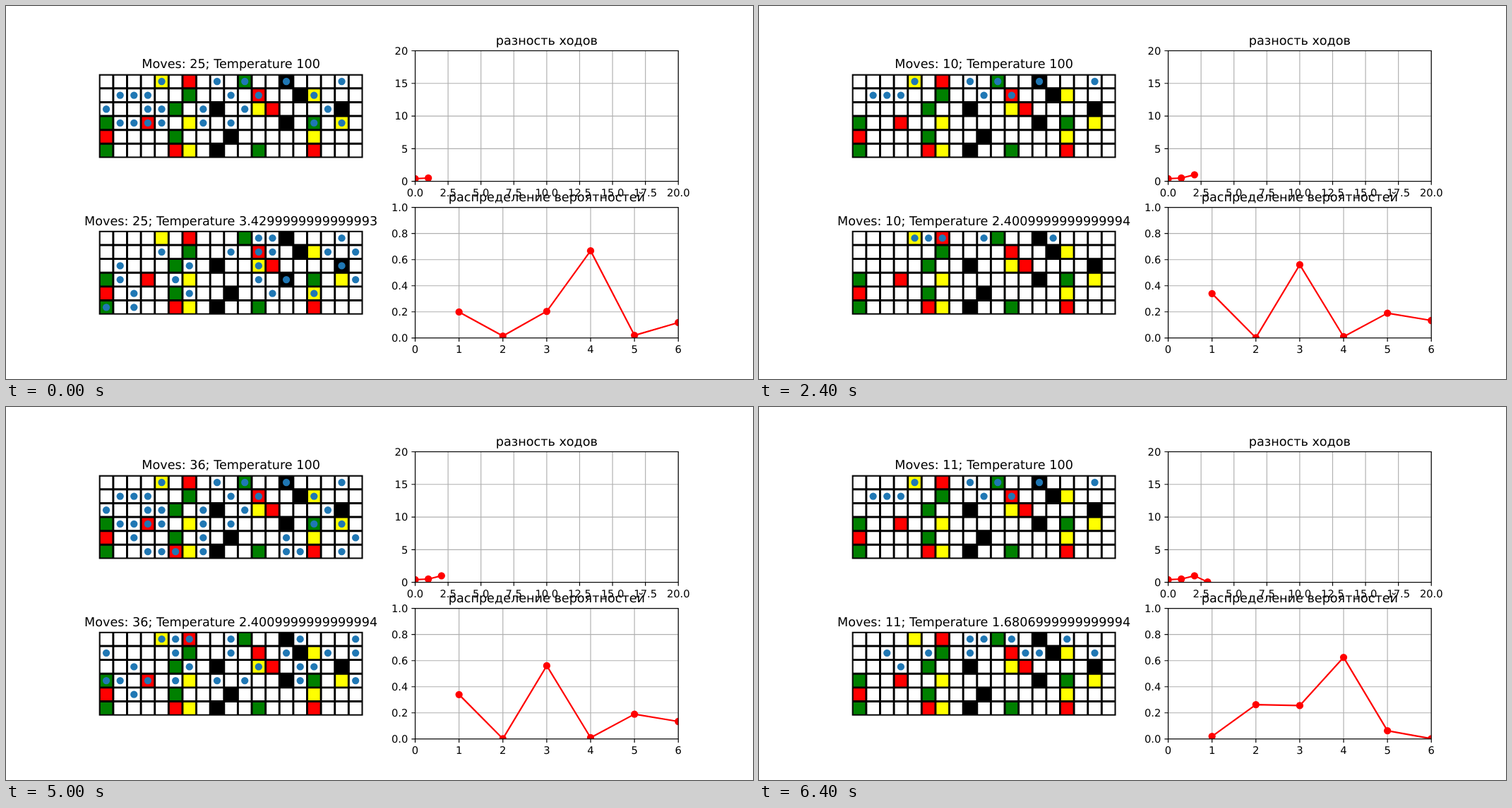
Write an HTML page that moves like this. It is 1058 px wide and 529 px high and loops after 6500 ms.

```html
<!DOCTYPE html>
<html lang="ru">
<head>
<meta charset="utf-8">
<style>
  html, body { margin: 0; width: 100%; height: 100%; overflow: hidden; background: #fff; }
  svg { display: block; width: 100%; height: 100%; }
  text { font-family: "DejaVu Sans", sans-serif; font-size: 14.69px; text-rendering: geometricPrecision; }
  .title { font-size: 17.63px; text-anchor: middle; }
  .mid { text-anchor: middle; }
  .end { text-anchor: end; }
</style>
</head>
<body>
<svg id="stage" viewBox="0 0 1058 529"></svg>
<script>
const NS = 'http://www.w3.org/2000/svg';
const stage = document.getElementById('stage');
const PT = 1058 / 720;
const LEFT = 132.25, RIGHT = 579.53, W = 372.7, H = 185.15;
const COLS = 19, CELL = W / COLS;

function add(parent, tag, attrs, text) {
  const el = document.createElementNS(NS, tag);
  for (const k in attrs) el.setAttribute(k, attrs[k]);
  if (text !== undefined) el.textContent = text;
  parent.appendChild(el);
  return el;
}

function clip(id, x, y, w, h) {
  add(add(stage, 'clipPath', { id }), 'rect', { x, y, width: w, height: h });
  return add(stage, 'g', { 'clip-path': `url(#${id})` });
}

function frame(x, y, w, h) {
  add(stage, 'rect', { x, y, width: w, height: h, fill: 'none', stroke: '#000', 'stroke-width': 0.8 * PT });
}

const MAP = [
  '....Y.R...G..K.....',
  '......G....R..KY...',
  '.....G..K..YR....K.',
  'G..R..Y......K.G.Y.',
  'R....G...K.....Y...',
  'G....RY.K..G...R...'
];
const PAINT = { Y: '#ff0', R: '#f00', G: '#008000', K: '#000' };

function makeBoard(id, top) {
  const h = MAP.length * CELL;
  const g = clip(id, LEFT, top, W, h);
  MAP.forEach((row, r) => [...row].forEach((c, i) => {
    if (PAINT[c]) add(g, 'rect', { x: LEFT + i * CELL, y: top + r * CELL, width: CELL, height: CELL, fill: PAINT[c] });
  }));
  let d = '';
  for (let i = 0; i <= COLS; i++) d += `M${LEFT + i * CELL} ${top}v${h}`;
  for (let i = 0; i <= MAP.length; i++) d += `M${LEFT} ${top + i * CELL}h${W}`;
  add(g, 'path', { d, stroke: '#000', 'stroke-width': 2 * PT });
  const dots = MAP.flatMap((row, r) => [...row].map((_, i) =>
    add(g, 'circle', { cx: LEFT + (i + 0.5) * CELL, cy: top + (r + 0.5) * CELL, r: 3.5 * PT, fill: '#1f77b4' })));
  frame(LEFT, top, W, h);
  const title = add(stage, 'text', { class: 'title', x: LEFT + W / 2, y: top - 6 * PT });

  return (path, move, temp) => {
    const seen = new Set(path.slice(0, move).flat());
    dots.forEach((dot, i) => dot.setAttribute('visibility', seen.has(i) ? 'visible' : 'hidden'));
    title.textContent = `Moves: ${Math.min(move, path.length)}; Temperature ${temp}`;
  };
}

function makePlot(id, top, name, xMax, xStep, yMax, yStep, xDigits, yDigits) {
  const px = x => RIGHT + x / xMax * W;
  const py = y => top + H - y / yMax * H;
  let grid = '', ticks = '';
  for (let i = 0; i <= Math.round(xMax / xStep); i++) {
    const x = px(i * xStep);
    grid += `M${x} ${top}v${H}`;
    ticks += `M${x} ${top + H}v${3.5 * PT}`;
    add(stage, 'text', { class: 'mid', x, y: top + H + 21.4 }, (i * xStep).toFixed(xDigits));
  }
  for (let i = 0; i <= Math.round(yMax / yStep); i++) {
    const y = py(i * yStep);
    grid += `M${RIGHT} ${y}h${W}`;
    ticks += `M${RIGHT} ${y}h${-3.5 * PT}`;
    add(stage, 'text', { class: 'end', x: RIGHT - 7 * PT, y: y + 5.4 }, (i * yStep).toFixed(yDigits));
  }
  const g = clip(id, RIGHT, top, W, H);
  add(g, 'path', { d: grid, stroke: '#b0b0b0', 'stroke-width': 0.8 * PT });
  add(stage, 'path', { d: ticks, stroke: '#000', 'stroke-width': 0.8 * PT });
  const series = add(g, 'g', {});
  frame(RIGHT, top, W, H);
  add(stage, 'text', { class: 'title', x: RIGHT + W / 2, y: top - 6 * PT }, name);

  return (values, first) => {
    series.textContent = '';
    const pts = values.map((v, i) => [px(i + first), py(v)]);
    add(series, 'polyline', { points: pts.join(' '), fill: 'none', stroke: '#f00', 'stroke-width': 1.5 * PT, 'stroke-linejoin': 'round' });
    for (const [cx, cy] of pts) add(series, 'circle', { cx, cy, r: 3.5 * PT, fill: '#f00' });
  };
}

const hold = (cell, n) => Array(n).fill(cell);
const long = (head, last) => head.padEnd(17, '9') + last;

// Cell reached on each move; a repeat is a lost turn, a pair is a double move.
const BASE = [4, 8, 10, 13, 17, 20, 21, 22, 28, 30, 30, 34, 38, 41, 42, 45, 48, 54, 58,
  59, 60, 61, 64, 66, [72, 74], 78, 83, 89, 94, 98, 99, 100, 102, 108, 109, 112];
const DIFFS = [0.4, 0.5, 1, 0.05];

const RUNS = [
  { start: -25, temp: long('3.42', 3),
    odds: [0.199, 0.015, 0.204, 0.668, 0.02, 0.118],
    path: [11, 11, 12, 17, 23, 28, 30, 31, 35, 37, 39, 44, 49, 55, 58, 62, 68, 70, 75,
      78, 82, 88, 91, 95, 97, 98, 99, 102, 108, 111] },
  { start: 14, temp: long('2.400', 4),
    odds: [0.34, 0.002, 0.561, 0.01, 0.19, 0.134],
    path: [4, 5, ...hold(6, 6), 9, 14, 18, 19, 24, 28, 32, 35, 37, 40, 44, 49, 52, 53, 57, 58,
      ...hold(60, 6), 62, 65, 67, 71, 75, 78, 81, 85] },
  { start: 53, temp: long('1.6806', 4),
    odds: [0.02, 0.263, 0.256, 0.625, 0.063, 0.002],
    path: [8, 9, 11, 15, 21, 24, 27, 31, 32, 36, 41] }
];

const upper = makeBoard('b1', 97.2);
const lower = makeBoard('b2', 319.4);
const diffPlot = makePlot('p1', 63.48, 'разность ходов', 20, 2.5, 20, 5, 1, 0);
const oddsPlot = makePlot('p2', 285.66, 'распределение вероятностей', 6, 1, 1, 0.2, 0, 1);

let shown = -1;
function draw(ms) {
  const step = Math.floor(ms % 6500 / 100);
  if (step === shown) return;
  shown = step;
  const n = step < 14 ? 0 : step < 53 ? 1 : 2;
  const run = RUNS[n], move = step - run.start;
  upper(BASE, move, 100);
  lower(run.path, move, run.temp);
  diffPlot(DIFFS.slice(0, n + 2), 0);
  oddsPlot(run.odds, 1);
}

const t0 = performance.now();
function tick() {
  draw(performance.now() - t0);
  requestAnimationFrame(tick);
}
tick();
</script>
</body>
</html>
```
